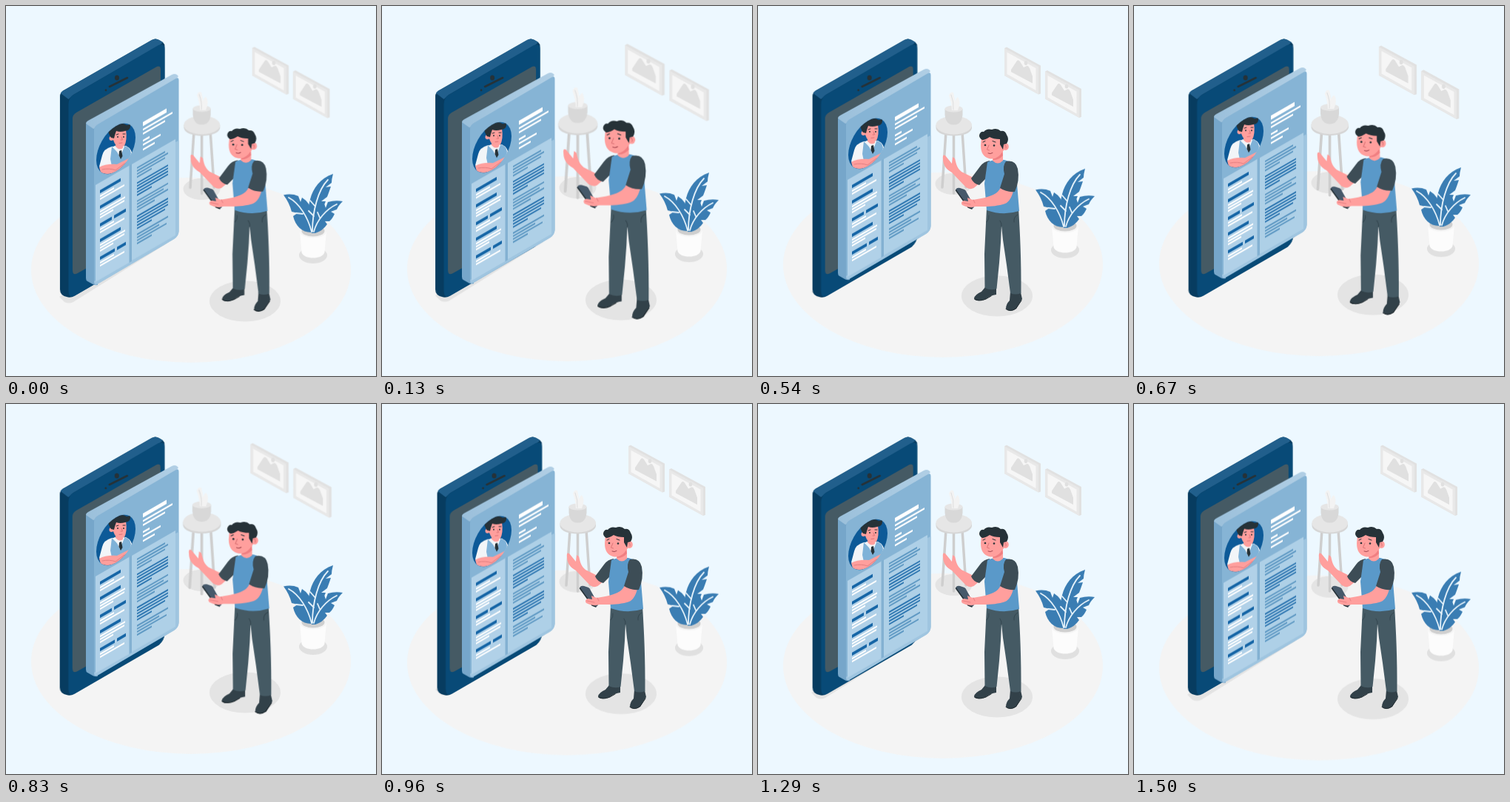
An HTML page that plays this animation: 500x500 px, repeating every 1.54 s.

```html
<!DOCTYPE html>
<html lang="en">
<head>
<meta charset="utf-8">
<title>Profile on a tablet</title>
<style>
  html, body { margin: 0; height: 100%; overflow: hidden; background: #edf8ff; }
  svg { display: block; width: 100vw; height: 100vh; }
  .float, .shake, .beat { animation: 1540ms linear -10ms infinite; }
  .float { animation-name: float; }
  .shake { animation-name: shake; }
  .beat { animation-name: beat; }
  #pictures { transform-origin: 384px 103px; }
  #stool { transform-origin: 265px 187px; }
  #man { transform-origin: 302px 290px; }
  @keyframes float { 50% { transform: translateY(-10px); } }
  @keyframes shake {
    10%, 90% { transform: translateX(-1px); }
    20%, 80% { transform: translateX(2px); }
    30%, 50%, 70% { transform: translateX(-4px); }
    40%, 60% { transform: translateX(4px); }
  }
  @keyframes beat {
    0%, 30%, 40%, 60%, 100% { transform: scale(1); }
    10%, 50% { transform: scale(1.1); }
  }
  .skin { fill: #ff9f9d; }
  .hair { fill: #263238; }
  .line { fill: none; stroke-linecap: round; stroke-linejoin: round; }
</style>
</head>
<body>
<svg viewBox="0 0 500 500">
  <defs>
    <clipPath id="round"><circle r="30.6" transform="matrix(.866 -.5 0 1 148.5 193)"/></clipPath>
    <linearGradient id="edge">
      <stop stop-color="#9bc0db"/>
      <stop offset="1" stop-color="#b1cfe5"/>
    </linearGradient>
    <g id="picture">
      <path fill="#e1e1e1" d="M0 0L3-1.500 49 23.500V61.500L46 62.500 0 37z"/>
      <path fill="#e8e8e8" d="M0 0L46 25V62.500L0 37z"/>
      <path fill="#f6f6f6" d="M3.500 5.500L42.500 27V57L3.500 35z"/>
      <path fill="#e0e0e0" d="M9 32L9 29 17 17Q19 15 21 18L26 26 30 24Q32 23 34 27L38 38V47.500z"/>
      <ellipse cx="29" cy="20" rx="2.300" ry="3" fill="#e0e0e0"/>
    </g>
  </defs>

  <g class="float">
    <ellipse cx="250" cy="357" rx="216" ry="125" fill="#f4f4f4"/>
    <path fill="#e3e3e3" d="M72 393L85 386 205 312 219 319Q217 322 211 325L91 400Q85 403 79 400z"/>
    <ellipse cx="264.500" cy="247.500" rx="25" ry="14.500" fill="#e4e4e4"/>
    <ellipse cx="323" cy="399" rx="48" ry="27.500" fill="#e4e4e4"/>
  </g>

  <g id="pictures" class="beat">
    <use href="#picture" x="333" y="57"/>
    <use href="#picture" x="388" y="88.500"/>
  </g>

  <g id="stool" class="beat">
    <path class="line" stroke="#cecece" stroke-width="3.500" stroke-linecap="butt" d="M254 170L249 245M264.500 172V253M276 170L281 245"/>
    <path fill="#d6d6d6" d="M240.500 161V165C242 179 287 179 289 165V161z"/>
    <ellipse cx="264.700" cy="161" rx="24.300" ry="12.500" fill="#e6e6e6"/>
    <path fill="#d8d8d8" d="M252.500 139V147Q253 155 258 159Q264.500 162 271 159Q276 155 276.500 147V139z"/>
    <ellipse cx="264.500" cy="139" rx="12" ry="4.500" fill="#e6e6e6"/>
    <path fill="#f3f3f3" d="M262 141Q262 132 258 121Q260 115 264 117Q268 131 266 141zM266 141Q264 127 270 123Q275 129 270 141z"/>
    <path class="line" stroke="#dedede" d="M261 120Q265 130 264 140"/>
  </g>

  <g class="float">
    <ellipse cx="415" cy="337" rx="19" ry="11" fill="#e0e0e0"/>
    <path fill="#fcfcfc" d="M397 304L399.500 333C402 343 428 343 430.500 333L433 304z"/>
    <ellipse cx="415" cy="304" rx="18" ry="9.500" fill="#f5f5f5"/>
    <ellipse cx="415" cy="304" rx="15.500" ry="7.500" fill="#cfcfcf"/>
    <g fill="#3a7db3">
      <path d="M413 307C404 280 407 239 442 227Q440 234 440 239L432 245 439 244Q436 253 434 258L426 264 432 264Q429 271 427 276L421 281 425 282Q421 294 417 307z"/>
      <path d="M412 306C400 306 391 297 388 284L394 280 386 278Q383 266 375 255.500Q386 253 395 257L398 265 400 259Q412 266 414 282L415 306z"/>
      <path d="M414 307C412 291 418 274 430 267L432 273 435 265Q445 262 455 264Q449 270 447 275L439 278 444 281Q441 288 437 291L431 291 434 295Q428 304 418 307z"/>
    </g>
    <path class="line" stroke="#e6f3fb" stroke-width="1.800" d="M414 305C414 277 422 248 435 235M413 305C408 286 397 267 382 259M416 305C420 290 432 275 447 268M418 271L411 263M416 284L409 277M401 281L392 280M424 286L421 279"/>
  </g>

  <g class="shake">
    <path fill="#073c60" d="M73 122Q73 117 78 114L197 46Q202 43 207 46L212 49Q214.500 51 214.500 55V311Q214 319 207 325.500L93 391.500Q87 395 82 393Q73 391 73 383z"/>
    <path fill="#215f8c" d="M74 118Q75 115 79 113.500L197 46Q202 43 207 46L212 49 209 52 91 120 84.500 126z"/>
    <path fill="#084a77" d="M84.500 132Q85 123 92 119.500L206 53Q214.500 50 214.500 58V311Q214 319 207 325.500L93 391.500Q84.500 396 84.500 385z"/>
    <path fill="#455a64" d="M90 152Q90 147 95 144L202 83Q209 79 209 86V292Q209 298 204 301L97 361Q90 365 90 357z"/>
    <ellipse cx="150" cy="97" rx="3" ry="3.600" fill="#263238"/>
    <path class="line" stroke="#263238" stroke-width="2.600" d="M140 109L164 97M135 113.500v.5"/>
  </g>

  <g class="float">
    <path fill="#76a6ca" d="M108 161Q108 155 112 156L122 162 124 377Q120 378 117 376L110 372Q108 371 108 368z"/>
    <path fill="url(#edge)" d="M108 159Q108 157 111 155L224 93Q228 91 231 93L233 95 229 100 123 164 118 166z"/>
    <path fill="#86b4d5" d="M119 168Q119 163 124 160L228 99Q233.500 95 233.500 100V304Q233.500 311 227 315L125 375Q119 379 119 372z"/>
    <path fill="#9fc5e0" d="M229 184L233.500 182V304Q233.500 311 227 315L125 375Q119 379 119 372L170 342z"/>
    <g id="sheet"></g>
    <g clip-path="url(#round)">
      <path fill="#0d5a98" d="M120 155h58v75h-58z"/>
      <path fill="#f2f5f8" d="M143 190Q132 193 130 202L126 217Q130 223 138 221L165 210 172 206Q171 193 162 189z"/>
      <path fill="#7fb2d8" d="M143 190L155 202 160 189Q168 191 169 199L166 213 144 221 141 207z"/>
      <path fill="#f2f5f8" d="M146 189L154 205 160 190z"/>
      <path class="hair" d="M153 196L156 195 157.500 203 155 207 152.500 202z"/>
      <path class="skin" d="M148 184L158 186 158 192Q153 196 148 190z"/>
      <path class="skin" d="M126 218Q135 213 150 214L166 206 165 212 151 223Q138 230 128 225z"/>
      <path class="line" stroke="#e27f81" d="M130 221Q140 219 148 222L160 213"/>
      <path class="skin" d="M144 169L162 167Q164 181 160 189Q152 192 147 186L144 179z"/>
      <circle class="skin" cx="142.500" cy="179" r="3"/>
      <path class="hair" d="M142 178Q137 171 139 166Q142 160 150 161Q157 157 163 161L168 160Q169 168 161 169Q154 171 149 169Q147 174 146 179z"/>
      <path class="line" stroke="#263238" d="M149 174L152 173M158 173L161 173"/>
      <circle class="hair" cx="151" cy="177" r="1"/><circle class="hair" cx="159" cy="177" r="1"/>
      <path class="line" stroke="#dc7477" d="M156 177L157.500 181 155 181M153 185.500L157 185"/>
    </g>
  </g>

  <g id="man" class="beat">
    <path fill="#324149" d="M307 380L322 381 322 390Q314 391 308 396Q294 401 292 395Q293 390 302 386z"/>
    <path fill="#324149" d="M341 386L355 387 357 396Q353 402 349 409Q340 415 335 409Q335 403 340 398z"/>
    <path class="line" stroke="#1d272c" d="M292.500 396Q299 400 308 396L315 392M335 409.500Q341 414 348.500 409L356 398"/>
    <path fill="#455a64" d="M309 273H352C354 305 356 345 355.500 388Q348 391 341 388L336 350 331 316 329 297 328 320 326 347 322.500 382Q315 385 306.500 381L306 335z"/>
    <path class="line" stroke="#34464f" d="M329 298Q330 294 327 290M312 283Q313 288 309 292M351 282Q345 285 346 292"/>
    <path class="skin" d="M291 232L275 224C269 219 268 214 266 206L263 204 262 213 253 202Q249 200 250 207C250 214 254 221 262 225L281 245Q289 250 294 244L300 239z"/>
    <path fill="#3d4d56" d="M313 209Q305 210 300 217L288 233Q291 240 299 242L312 229z"/>
    <path fill="#5a99c9" d="M310 211Q320 206 333 208L346 212 350 240 353 277Q331 284 309 276L306 240z"/>
    <path class="skin" d="M317 198L331 194 331 209Q324 216 317 209z"/>
    <path fill="#f07f82" d="M318 205Q326 205 330 197L331 202Q326 208 318 208z"/>
    <path fill="#46596a" d="M267 249Q268 245 273 246L279 248Q281 249 282 252L292 270Q292 274 288 274L284 272z"/>
    <path class="line" stroke="#263238" stroke-width="1.500" d="M267.500 249L284 272 289 274"/>
    <path class="skin" d="M328 245L345 250Q341 266 331 268C316 272 302 271 294 271Q285 274 276 269Q273 265 278 263L284 264 283 259 290 262C303 260 312 258 318 255Q325 252 328 245z"/>
    <path class="line" stroke="#e98184" d="M277 266L287 268M291 262L293 266"/>
    <path fill="#3d4d56" d="M335 210Q348 207 351 220Q354 236 347 251Q336 252 327 246L333 227Q330 216 335 210z"/>
    <path class="skin" d="M302 177L301 188Q301 203 312 206Q319 208 325 203L333 194V176Q318 169 302 177z"/>
    <ellipse class="skin" cx="334.500" cy="190" rx="4.300" ry="5"/>
    <path class="hair" d="M303 181Q297 177 300 172Q302 169 305 170Q309 165 316 167Q323 164 328 169Q334 168 336 174Q340 180 336 186L332 187 331 194 327 187 327 180Q318 180 313 177Q307 181 303 181z"/>
    <path class="line" stroke="#263238" d="M304 184L307 182.500M317 182.500L321 184"/>
    <circle class="hair" cx="307" cy="188" r="1.300"/><circle class="hair" cx="319" cy="188.500" r="1.300"/>
    <path class="line" stroke="#dc7477" d="M312 188L309.500 194 312.500 195M333 188Q336 188 335 192"/>
    <path class="line" stroke="#a34750" d="M311 199Q314 200.500 317 198.500"/>
  </g>
</svg>
<script>
  const sheet = document.getElementById('sheet');
  const SLOPE = Math.tan(Math.PI / 6);

  // Slanted bar: x, y is its upper left corner.
  function bar(x, y, w, h, fill) {
    const p = document.createElementNS('http://www.w3.org/2000/svg', 'path');
    const rise = w * SLOPE;
    p.setAttribute('d', `M${x} ${y}l${w} ${-rise}v${h}l${-w} ${rise}z`);
    p.setAttribute('fill', fill);
    sheet.append(p);
  }

  bar(121, 242, 46, 131, '#b1d1e8');
  bar(170, 214, 59, 130, '#aed0e7');
  bar(166.5, 216, 3.5, 131, '#83b1d2');

  // Name and details
  bar(185, 157, 32, 5.5, '#fff');
  [[166, 40], [171.5, 30], [181, 9], [186.5, 24], [193, 16]]
    .forEach(([y, w]) => bar(185, y, w, 2.6, '#fff'));

  // Left column: headings, each with white lines below
  [[249, 28, 0], [270, 28, 0], [294, 16, 16], [315, 28, 0], [339, 20, 12]].forEach(([y, w, rest], i) => {
    bar(127, y, w, 4.2, '#1565a6');
    if (rest) bar(130 + w, y - (w + 3) * SLOPE, rest, 4.2, '#1565a6');
    const widths = i % 2 ? [34, 33, 18] : [19, 33];
    widths.forEach((n, k) => bar(127, y + 7 + k * 4, n, 2.2, '#fff'));
  });

  // Right column: paragraphs of alternating strength
  const rows = [[38, 42, 38, 20], [42, 42, 42, 42, 20], [42, 36, 42, 24], [42, 42, 42, 38, 20], [42, 30, 40, 20]];
  let y = 218;
  rows.forEach((para, i) => {
    para.forEach(w => {
      bar(177, y, w, 2.1, i % 2 ? '#2a74b0' : '#5d98c3');
      y += 4.1;
    });
    y += 4;
  });
</script>
</body>
</html>
```
